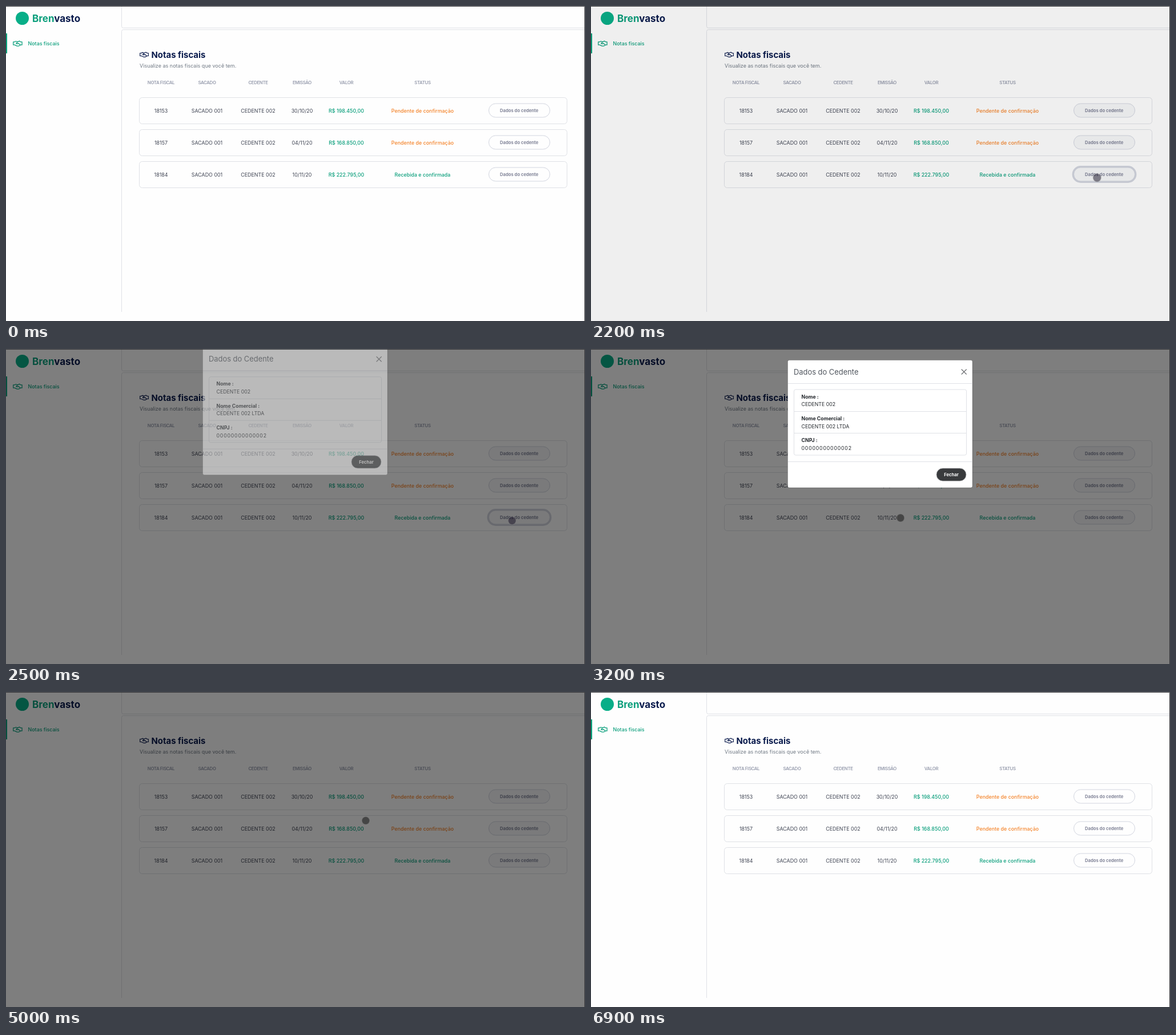
Animation of 1014 by 552 pixels, one loop 7.1 s. Source, as an HTML page:

```html
<!DOCTYPE html>
<html lang="pt-BR">
<head>
<meta charset="utf-8">
<title>Notas fiscais</title>
<style>
  html, body { margin: 0; width: 100%; height: 100%; overflow: hidden; background: #fefefe; }
  svg { display: block; width: 100vw; height: 100vh; }
  text { font-family: Inter, "Open Sans", sans-serif; font-size: 8.9px; fill: #3f4453; }
  .mid { text-anchor: middle; }
  .logo { font-size: 17px; font-weight: 700; fill: #0a1b4d; }
  .title { font-size: 14.9px; font-weight: 700; fill: #0a1b4d; }
  .subtitle { font-size: 9px; fill: #6f7883; }
  .head { font-size: 7.8px; font-weight: 600; letter-spacing: -.35px; fill: #989dae; }
  .strong { font-weight: 500; }
  .button { font-size: 7.65px; font-weight: 700; fill: #83869a; }
  .teal { fill: #0b9f7c; }
  .orange { fill: #f4842b; }
  .line { fill: none; stroke: #dfe1e6; }
  .pill { fill: none; stroke: #d2d5df; }
  .dimmed .pill { fill: #5b6385; fill-opacity: .05; }
  .modal-title { font-size: 12.9px; fill: #50565e; }
  .label { font-size: 8.75px; font-weight: 700; fill: #24282d; }
  .value { font-size: 8.75px; fill: #24282d; }
  .digits { letter-spacing: .8px; }
</style>
</head>
<body>
<svg viewBox="0 0 1014 552" preserveAspectRatio="none">
  <defs>
    <path id="handshake" fill="none" stroke-width="1.2" stroke-linejoin="round"
      d="M.7 2.5H3L5 1.4 8 2.5 11 1 13 2.5H15.3V7.5H13L10 9.3H7L3 7.5H.7ZM8 2.5 5.5 5Q7 6.4 9 4.8L12.5 7.5"/>
  </defs>
  <rect width="1014" height="552" fill="#fefefe"/>

  <circle cx="28.5" cy="21.5" r="11.5" fill="#08ae88"/>
  <text class="logo" x="46" y="27.5"><tspan class="teal">Bren</tspan>vasto</text>
  <rect y="48" width="2" height="35" fill="#00a27c"/>
  <use href="#handshake" transform="translate(12 60.3) scale(1.05)" stroke="#0b9f7c"/>
  <text class="strong teal" x="38.5" y="69">Notas fiscais</text>

  <path class="line" d="M202.5 0V35.5Q202.5 38.5 205.5 38.5H1013M1013 41.5H205.5Q202.5 41.5 202.5 44.5V536"/>
  <use href="#handshake" transform="translate(234 80)" stroke="#0a1b4d"/>
  <text class="title" x="254.5" y="90.5">Notas fiscais</text>
  <text class="subtitle" x="234" y="108">Visualize as notas fiscais que você tem.</text>
  <g id="table"></g>

  <rect id="backdrop" width="1014" height="552"/>
  <g id="modal">
    <rect x="344.5" y="19.5" width="323.5" height="223.5" rx="3" fill="#fff" stroke="#000" stroke-opacity=".2"/>
    <text class="modal-title" x="355" y="44.5">Dados do Cedente</text>
    <path d="M648.7 35.5 657.7 44.5M657.7 35.5 648.7 44.5" stroke="#6d6f72" stroke-width="1.2"/>
    <path class="line" d="M345 60.5H668M345 197.5H668M355 109.5H658M355 147.5H658"/>
    <rect class="line" x="355.5" y="71" width="302" height="115" rx="3"/>
    <g id="details"></g>
    <rect id="closeRing" x="603.2" y="207.2" width="55.5" height="26" rx="13" fill="none"
      stroke="#808386" stroke-opacity=".5" stroke-width="3"/>
    <rect x="605" y="209" width="52" height="22.3" rx="11.1" fill="#393b3d" stroke="#b9bbbd" stroke-width=".7"/>
    <text class="button mid" x="631" y="222.8" style="fill:#fff">Fechar</text>
  </g>

  <circle id="cursor" r="6.9" stroke="#888" stroke-opacity=".4" stroke-width="1.4"/>
  <path d="M0 .5H1013.5V552" fill="none" stroke="#333437"/>
</svg>
<script>
  const LOOP = 7100, STEP = 100, ROW_PITCH = 56, DETAIL_PITCH = 38.3;
  const $ = id => document.getElementById(id);
  const text = (x, y, cls, str) => `<text class="${cls}" x="${x}" y="${y}">${str}</text>`;

  const columns = [
    ['NOTA FISCAL', 271.5], ['SACADO', 352], ['CEDENTE', 441.5],
    ['EMISSÃO', 518.5], ['VALOR', 596], ['STATUS', 729.5]
  ];
  const pending = 'Pendente de confirmação';
  const invoices = [
    ['18153', '30/10/20', '198.450,00', pending],
    ['18157', '04/11/20', '168.850,00', pending],
    ['18184', '10/11/20', '222.795,00', 'Recebida e confirmada']
  ];

  function invoiceRow([number, date, amount, status], i) {
    const y = 160.5 + i * ROW_PITCH;
    const statusTone = status === pending ? 'strong orange' : 'strong teal';
    const cells = [
      [number], ['SACADO 001'], ['CEDENTE 002'], [date],
      ['R$ ' + amount, 'strong teal'], [status, statusTone]
    ];
    return `<rect class="line" x="233.5" y="${y}" width="749" height="46" rx="5"/>`
      + cells.map(([str, tone = ''], c) => text(columns[c][1], y + 26, 'mid ' + tone, str)).join('')
      + `<rect class="pill" x="845.5" y="${y + 10.5}" width="107" height="24" rx="12"/>`
      + text(898.7, y + 25.3, 'mid button', 'Dados do cedente');
  }

  $('table').innerHTML =
    columns.map(([head, x]) => text(x, 136.5, 'mid head', head)).join('')
    + invoices.map(invoiceRow).join('')
    + `<rect id="focusRing" x="844.2" y="281.7" width="109.6" height="26.6" rx="13.3"
        fill="none" stroke="#d1d4de" stroke-width="3.2"/>`;

  $('details').innerHTML = [
    ['Nome :', 'CEDENTE 002', ''],
    ['Nome Comercial :', 'CEDENTE 002 LTDA', ''],
    ['CNPJ :', '00000000000002', 'digits']
  ].map(([label, value, cls], i) =>
    text(368.5, 86.7 + i * DETAIL_PITCH, 'label', label)
    + text(368.5, 100.2 + i * DETAIL_PITCH, 'value ' + cls, value)).join('');

  const ramp = (t, start, duration) => Math.min(1, Math.max(0, (t - start) / duration));
  const between = (t, start, end) => t >= start && t < end;
  const easeOut = p => Math.sin(p * Math.PI / 2);
  const easeInOut = p => p * p * (3 - 2 * p);

  // Each pointer move: start, end, path
  const moves = [
    [300, 1100, 'M12.5 -6.5L732 284L277 98'],
    [1200, 1800, 'M277 98Q780 370 886.3 300.8'],
    [2700, 3200, 'M886.3 300.8L542 296'],
    [3200, 3400, 'M542 296L475.7 274'],
    [3500, 4100, 'M475.7 274L630 225.3'],
    [5400, 5600, 'M630 225.3H735.5'],
    [5700, 6100, 'M735.5 225.3Q790 260 874 59']
  ].map(([start, end, d]) => {
    const path = document.createElementNS('http://www.w3.org/2000/svg', 'path');
    path.setAttribute('d', d);
    return { start, end, path, length: path.getTotalLength() };
  });

  function cursorAt(t) {
    const { start, end, path, length } = moves.filter(move => move.start <= t).pop() || moves[0];
    return path.getPointAtLength(length * easeInOut(ramp(t, start, end - start)));
  }

  const set = (id, attributes) => {
    for (const name in attributes) $(id).setAttribute(name, attributes[name]);
  };

  function render(now) {
    const t = Math.floor(now % LOOP / STEP) * STEP;
    const dim = .5 * (ramp(t, 2187, 110) - ramp(t, 5100, 100));
    const slide = easeOut(ramp(t, 2430, 300)) - easeOut(ramp(t, 4790, 300));
    set('backdrop', { opacity: dim });
    set('modal', {
      opacity: ramp(t, 2430, 150) - ramp(t, 4790, 150),
      transform: `translate(0 ${-34.7 * (1 - slide)})`
    });
    set('table', { class: dim > 0 ? 'dimmed' : '' });
    set('focusRing', { opacity: +(between(t, 2200, 2800) || between(t, 5300, 6900)) });
    set('closeRing', { opacity: +between(t, 4800, 5300) });

    const { x, y } = cursorAt(t);
    set('cursor', {
      transform: `translate(${x} ${y})`,
      fill: between(t, 2000, 2700) ? 'rgba(20,14,36,.5)' : 'rgba(0,0,0,.45)',
      opacity: +(t < 6100)
    });
  }

  const start = performance.now();
  function tick() {
    render(performance.now() - start);
    requestAnimationFrame(tick);
  }
  tick();
</script>
</body>
</html>
```
